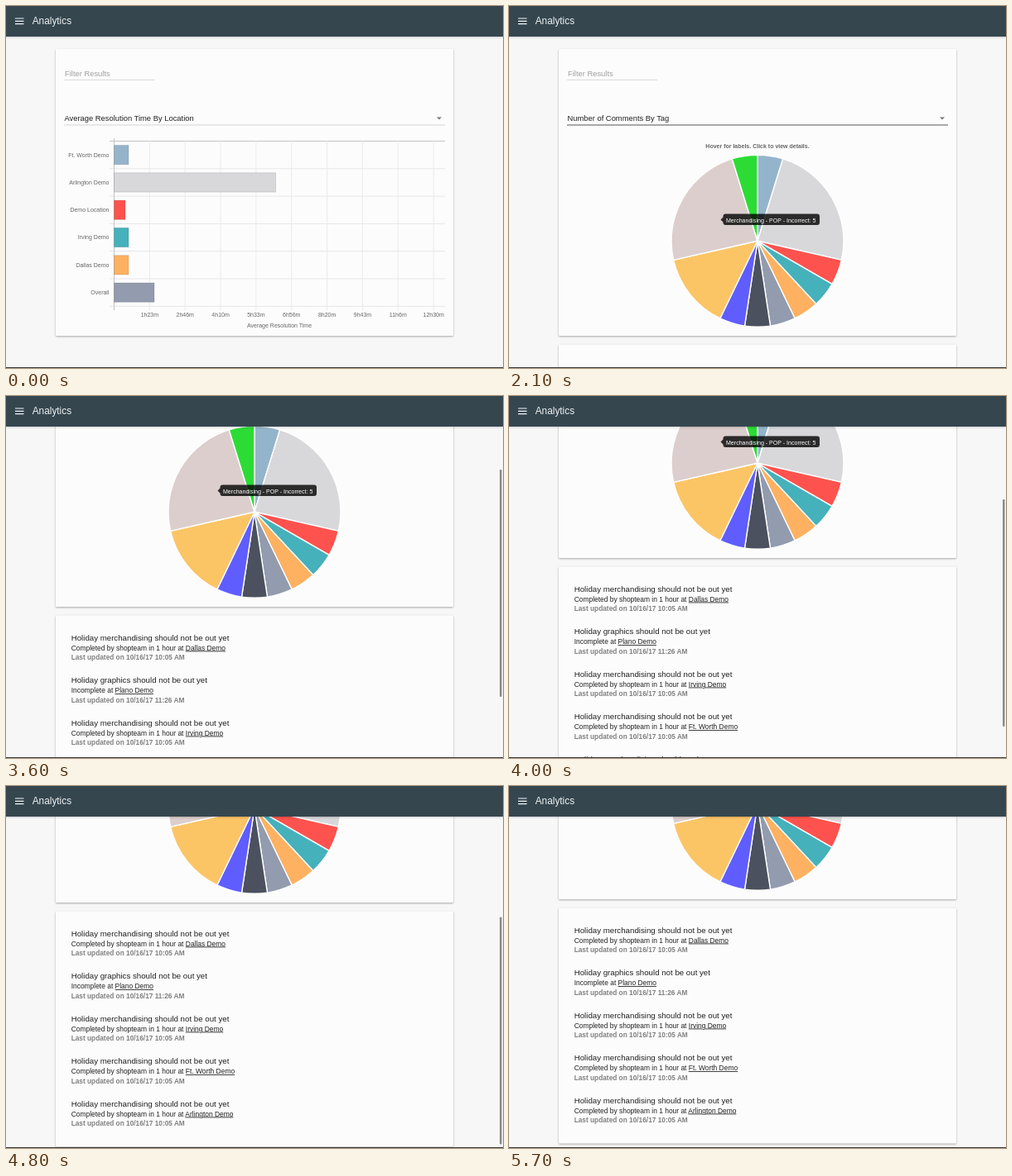
Recreate the animation shown at these times as an HTML page. Size 600 by 438 pixels, loop 8 s.

```html
<!DOCTYPE html>
<html lang="en">
<head>
<meta charset="utf-8">
<title>Analytics</title>
<style>
  html, body { margin: 0; width: 100%; height: 100%; overflow: hidden; background: #f7f7f8; }
  svg { display: block; width: 600px; height: 438px; font-family: "Liberation Sans", Arial, sans-serif; }
  .card { fill: #fdfcfd; filter: drop-shadow(0 1px 1px rgba(0,0,0,.32)); }
  .field { font-size: 9.4px; fill: #222; }
  .small { font-size: 7px; fill: #666; }
  .title { font-size: 9.7px; fill: #222; }
  .sub { font-size: 8.43px; fill: #222; }
  .date { font-size: 8.3px; font-weight: bold; fill: #808080; }
  .link { text-decoration: underline; }
  .end { text-anchor: end; }
  .mid { text-anchor: middle; }
</style>
</head>
<body>
<svg viewBox="0 0 600 438">
  <rect width="600" height="438" fill="#f7f7f8"/>
  <g id="page">
    <rect class="card" x="60" y="52" width="480" height="347" rx="1"/>
    <text class="field" x="71" y="84.5" style="fill:#a0a0a0">Filter Results</text>
    <path d="M70 89.5H179" stroke="#d9d9d9"/>
    <text class="field" id="choice" x="70.5" y="139"></text>
    <path d="M520 134.5h6l-3 3z" fill="#777"/>
    <path id="underline" d="M70 144H530"/>
    <g id="bars"></g>
    <g id="tags">
      <rect class="card" x="60" y="409.5" width="480" height="285" rx="1"/>
      <text class="small mid" x="300" y="171.5" font-weight="bold">Hover for labels. Click to view details.</text>
      <g id="pie" stroke="#fff" stroke-width="1.4" stroke-linejoin="bevel"></g>
      <g id="tip">
        <path d="M255.500 258.500l3-3v-1q0-3 3-3h110.500q3 0 3 3v7.500q0 3-3 3h-110.500q-3 0-3-3v-.500z" fill="#000" fill-opacity=".8"/>
        <text x="262" y="262" font-size="7.05" fill="#fff">Merchandising - POP - Incorrect: 5</text>
      </g>
      <g id="list"></g>
    </g>
  </g>
  <rect id="thumb" x="596" width="2.500" height="275" rx="1.200" fill="#8b8b8b"/>
  <rect width="600" height="37" fill="#35464f" style="filter:drop-shadow(0 1px 1px rgba(0,0,0,.2))"/>
  <path d="M11 15H21.500M11 18.300H21.500M11 21.600H21.500" stroke="#f2f4f5" stroke-width="1.200"/>
  <text x="31.700" y="22.300" font-size="11.850" fill="#eef1f2">Analytics</text>
  <path d="M0 437.500H600" stroke="#3a3a3a"/>
</svg>
<script>
const $ = id => document.getElementById(id);
const LOOP = 8000, STEP = 100;
const COLORS = ['#94b4cb', '#d8d8da', '#fe524e', '#45b1bb', '#feb161', '#929cae',
                '#4b515e', '#605dff', '#fbc566', '#561005', '#2cdc35'];
const COUNTS = [1, 5, 1, 1, 1, 1, 1, 1, 3, 5, 1];
const TOTAL = 21, HOVERED = 9;

// Bar chart
const BARS = [['Ft. Worth Demo', 148], ['Arlington Demo', 325.5], ['Demo Location', 144],
              ['Irving Demo', 148], ['Dallas Demo', 148], ['Overall', 179]];
const TICKS = ['1h23m', '2h46m', '4h10m', '5h33m', '6h56m', '8h20m', '9h43m', '11h6m', '12h30m'];
const ROW = 33.3, TOP = 163.5;

function barChart() {
  let s = '';
  for (let i = 0; i <= 6; i++)
    s += `<path d="M125 ${TOP + i * ROW}H530" stroke="${i ? '#e6e6e7' : '#c4c4c4'}"/>`;
  TICKS.forEach((label, i) => {
    const x = 130.5 + (i + 1) * 42.85;
    s += `<path d="M${x} ${TOP}V368" stroke="#ebebec"/>
      <text class="small mid" x="${x}" y="376">${label}</text>`;
  });
  s += `<path d="M130.500 160V368" stroke="#c4c4c4"/>`;
  BARS.forEach(([label, end], i) => {
    const y = TOP + i * ROW + 5;
    s += `<text class="small end" x="124.500" y="${y + 14}">${label}</text>
      <rect x="130.500" y="${y}" width="${end - 130.5}" height="23.300" fill="${COLORS[i]}" stroke="#000" stroke-opacity=".12"/>`;
  });
  return s + '<text class="small mid" x="330" y="388.500">Average Resolution Time</text>';
}

// Comment list
const PLACES = ['Dallas', 'Plano', 'Irving', 'Ft. Worth', 'Arlington'];

function commentList() {
  return PLACES.map((place, i) => {
    const open = place === 'Plano', y = 439.8 + i * 51.5;
    return `<text class="title" x="78.700" y="${y}">Holiday ${open ? 'graphics' : 'merchandising'} should not be out yet</text>
      <text class="sub" x="78.700" y="${y + 11.7}">${open ? 'Incomplete' : 'Completed by shopteam in 1 hour'} at <tspan class="link">${place} Demo</tspan></text>
      <text class="date" x="78.700" y="${y + 23.4}">Last updated on 10/16/17 ${open ? '11:26' : '10:05'} AM</text>`;
  }).join('');
}

function drawPie(part, hover) {
  const R = 104, point = a => `${300 + R * Math.sin(a)} ${284.3 - R * Math.cos(a)}`;
  let from = 0;
  $('pie').innerHTML = part <= 0 ? '' : COUNTS.map((n, i) => {
    const to = from + n / TOTAL * 2 * Math.PI * part;
    const fill = hover && i === HOVERED ? '#dccecc' : COLORS[i];
    const d = `M300 284.300L${point(from)}A${R} ${R} 0 0 1 ${point(to)}Z`;
    from = to;
    return `<path d="${d}" fill="${fill}"/>`;
  }).join('');
}

// Scroll offset as [time, offset] points
const SCROLL = [[3100, 0], [3300, 42], [3600, 144], [3800, 183], [4000, 203], [4200, 219],
                [4400, 231], [4500, 231], [4800, 258], [5000, 262]];

function scrollAt(t) {
  const k = SCROLL.findIndex(p => p[0] > t);
  if (k === 0) return 0;
  if (k < 0) return 262;
  const [t0, a] = SCROLL[k - 1], [t1, b] = SCROLL[k];
  return a + (b - a) * (t - t0) / (t1 - t0);
}

const clamp = v => Math.max(0, Math.min(1, v));
const show = (id, on) => $(id).style.display = on ? '' : 'none';

function render(t) {
  const tags = t >= 600, scroll = scrollAt(t);
  show('bars', !tags);
  show('tags', tags);
  show('list', t >= 2300);
  $('choice').textContent = tags ? 'Number of Comments By Tag' : 'Average Resolution Time By Location';
  $('underline').setAttribute('stroke', tags ? '#555' : '#d5d5d5');
  drawPie(1 - (1 - clamp((t - 1118) / 782)) ** 3.02, t >= 2000);
  $('tip').setAttribute('opacity', clamp((t - 1900) / 200));
  $('page').setAttribute('transform', `translate(0 ${-scroll})`);
  $('thumb').setAttribute('y', 1.3 + scroll * 0.609);
  $('thumb').setAttribute('opacity', t < 3200 ? 0 : clamp((5700 - t) / 600));
}

$('bars').innerHTML = barChart();
$('list').innerHTML = commentList();
let last = -1;
function tick() {
  const t = Math.floor(performance.now() % LOOP / STEP) * STEP;
  if (t !== last) render(last = t);
  requestAnimationFrame(tick);
}
tick();
</script>
</body>
</html>
```
